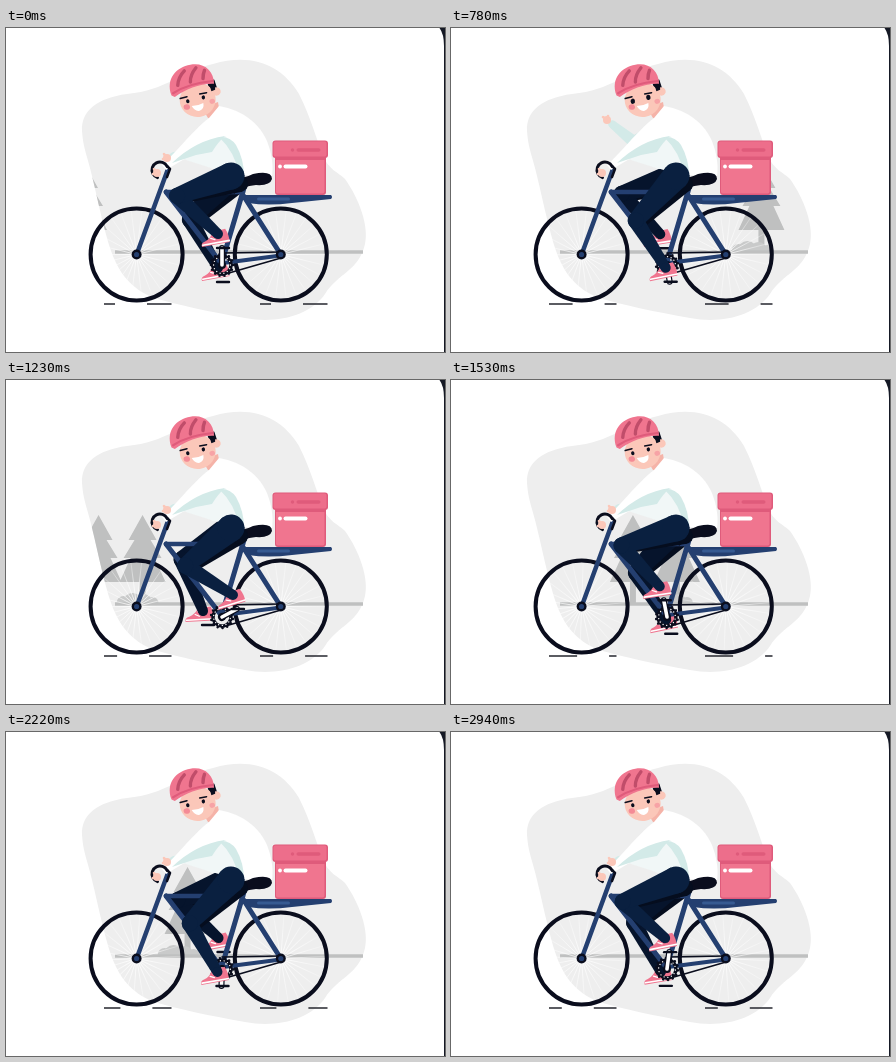
Write an HTML page with a canvas that moves like this. It is 439 px wide and 324 px high and loops after 2970 ms.

```html
<!DOCTYPE html>
<html lang="en">
<head>
<meta charset="utf-8">
<title>Delivery cyclist</title>
<style>
html, body { margin: 0; width: 100%; height: 100%; overflow: hidden; background: #fff; }
canvas { display: block; }
</style>
</head>
<body>
<canvas id="stage" width="439" height="324"></canvas>
<script>
const ctx = document.getElementById('stage').getContext('2d');
const LOOP = 2970, STEP = 30, TURN = LOOP / 2, TAU = 2 * Math.PI;
const INK = '#0a0d1d', BLUE = '#243f70', PINK = '#f0758f', ROSE = '#df5b7b',
      SKIN = '#fbc7b9', TEAL = '#d3eae8', GREY = '#bfc0c0';
const HIP = [229, 152], WAIST = [225, 148], CRANK = [216, 237], THIGH = 60, CALF = 56;
const FRONT = 130.6, REAR = 274.8, AXLE = 226.5;

const blob = new Path2D('M76 103C75 83 91 70 121 66C161 62 174 44 207 36C245 25 275 36 293 66C305 90 310 110 317 128C323 142 332 144 339 151C354 172 363 199 359 216C353 243 332 245 319 266C304 288 270 296 239 290C205 284 172 277 148 270C118 258 108 235 101 210C93 180 91 168 86 148C82 130 77 120 76 103Z');
const torso = new Path2D('M203 90L213 78C237 82 258 97 264 122C267 134 267 142 266 148L237 147L205 140L190 124L160 142L156 137C168 127 186 103 203 90Z');

const lerp = (a, b, p) => a + (b - a) * p;
const mix = (a, b, p) => [lerp(a[0], b[0], p), lerp(a[1], b[1], p)];
const ease = (a, b, t) => {
  const p = Math.min(1, Math.max(0, (t - a) / (b - a)));
  return p * p * (3 - 2 * p);
};

function fill(path, color) {
  ctx.fillStyle = color;
  ctx.fill(typeof path === 'string' ? new Path2D(path) : path);
}
function line(path, color, width, cap = 'round') {
  ctx.strokeStyle = color;
  ctx.lineWidth = width;
  ctx.lineCap = cap;
  ctx.lineJoin = 'round';
  ctx.stroke(new Path2D(path));
}
function arc(x, y, r, color, width, from = 0, to = TAU) {
  ctx.strokeStyle = color;
  ctx.lineWidth = width;
  ctx.beginPath();
  ctx.arc(x, y, r, from, to);
  ctx.stroke();
}
function oval(x, y, rx, ry, color, turn = 0) {
  ctx.fillStyle = color;
  ctx.beginPath();
  ctx.ellipse(x, y, rx, ry, turn, 0, TAU);
  ctx.fill();
}
const dot = (x, y, r, color) => oval(x, y, r, r, color);
function box(x, y, w, h, r, color) {
  ctx.fillStyle = color;
  ctx.beginPath();
  ctx.roundRect(x, y, w, h, r);
  ctx.fill();
}
function placed(x, y, turn, draw) {
  ctx.save();
  ctx.translate(x, y);
  ctx.rotate(turn);
  draw();
  ctx.restore();
}
// Tapered limb with round ends
function limb(a, b, wa, wb, color) {
  const turn = Math.atan2(b[1] - a[1], b[0] - a[0]);
  const len = Math.hypot(b[0] - a[0], b[1] - a[1]);
  placed(a[0], a[1], turn, () => {
    fill(`M0 ${-wa / 2}L${len} ${-wb / 2}V${wb / 2}L0 ${wa / 2}Z`, color);
    dot(0, 0, wa / 2, color);
    dot(len, 0, wb / 2, color);
  });
}

function tree(x) {
  fill(`M${x} 135l14 25h-6l11 18h-7l11 24h-20v21h-6v-21h-20l11-24h-7l11-18h-6Z`, GREY);
}
function bush(x) {
  for (const [dx, r] of [[-13, 7], [-4, 10], [7, 9], [16, 6]]) {
    ctx.beginPath();
    ctx.arc(x + dx, 223, r, Math.PI, TAU);
    ctx.fillStyle = '#c9caca';
    ctx.fill();
  }
}

function scenery(t) {
  fill(blob, '#eeeeee');
  ctx.save();
  ctx.clip(blob);
  const shift = 0.298 * t;
  for (const x of [78, -274, -230, -480]) tree(x + shift);
  for (const x of [68, -236, -490]) bush(x + shift);
  ctx.restore();
  line('M109 224H357', GREY, 3.5, 'butt');
}

function road(t) {
  for (const x of [98, 254]) {
    ctx.save();
    ctx.beginPath();
    ctx.rect(x, 270, 67.5, 12);
    ctx.clip();
    const start = (0.27 * t + 11) % 66 - 34;
    for (let i = -1; i < 2; i++) box(x + start + 66 * i, 275.2, 34, 1.6, 0, '#25262e');
    ctx.restore();
  }
}

function wheel(x, t) {
  placed(x, AXLE, -0.0059 * t, () => {
    const glow = ctx.createRadialGradient(0, 0, 5, 0, 0, 45);
    glow.addColorStop(0, 'rgba(255,255,255,.8)');
    glow.addColorStop(1, 'rgba(255,255,255,.25)');
    let spokes = '';
    for (let i = 0; i < 26; i++) {
      const a = i * TAU / 26;
      spokes += `M0 0L${45 * Math.cos(a)} ${45 * Math.sin(a)}`;
    }
    line(spokes, glow, 0.9);
  });
  arc(x, AXLE, 46, INK, 4);
}

function hub(x) {
  dot(x, AXLE, 5, INK);
  dot(x, AXLE, 2.6, BLUE);
}

const pedal = angle => [CRANK[0] - 17 * Math.sin(angle), CRANK[1] - 17 * Math.cos(angle)];

function shoe(x, y, turn) {
  placed(x, y, turn, () => {
    fill('M-5 -3L8 -4Q11 3 10 10H-18Q-19 6 -14 5Q-8 3 -5 -3Z', PINK);
    line('M-17 8.3H10', '#fff', 1.6);
    line('M-8 3L-4 5M-5 0L-1 3', '#fff', 1.3);
  });
}

function leg(angle, color, shade) {
  const [px, py] = pedal(angle);
  const ankle = [px - 4, py - 14];
  const dx = ankle[0] - HIP[0], dy = ankle[1] - HIP[1], d = Math.hypot(dx, dy);
  const along = (THIGH ** 2 - CALF ** 2 + d * d) / (2 * d);
  const out = Math.sqrt(THIGH ** 2 - along ** 2);
  const knee = [HIP[0] + (dx * along - dy * out) / d, HIP[1] + (dy * along + dx * out) / d];
  line(`M${px - 5} ${py}h12`, INK, 2.4);
  shoe(ankle[0], ankle[1], -0.18 + 0.14 * Math.sin(angle));
  limb([234, 156], [knee[0] + 5, knee[1] + 3], 16, 10, shade);
  limb(knee, ankle, 16, 10, color);
  limb(WAIST, knee, 27, 16, color);
}

function crankArm(angle) {
  const path = `M${CRANK}L${pedal(angle)}`;
  line(path, INK, 6);
  line(path, '#fff', 3.6);
}

function frame() {
  line('M160 164H237', BLUE, 4.5);
  line('M160 164L215 235M238 160L216 234M237 167L274.8 226.5', BLUE, 5);
  line('M217 235L274.8 227.5', BLUE, 4);
  line('M130.6 226.5L162 141', BLUE, 4.5);
  fill('M239 167H325Q327 169 325 171L286 175Q262 178 242 175Z', BLUE);
  box(251, 169.5, 33, 3, 1.5, '#365a91');
  line('M216 225L275 224M216 247L275 230', INK, 1.6);
}

function chainring(angle) {
  placed(CRANK[0], CRANK[1], -angle, () => {
    arc(0, 0, 9, INK, 3.5);
    for (let i = 0; i < 14; i++) {
      const a = i * TAU / 14;
      dot(11 * Math.cos(a), 11 * Math.sin(a), 1.3, INK);
      dot(8.4 * Math.cos(a), 8.4 * Math.sin(a), 0.7, '#fff');
    }
    dot(0, 0, 4, INK);
  });
}

function parcel() {
  box(269, 127, 51, 40, 3, ROSE);
  box(270, 128, 48.5, 37.5, 2, PINK);
  box(269.5, 129, 50, 3, 0, ROSE);
  box(266.5, 112.5, 55.5, 17.5, 3, ROSE);
  box(267.5, 113.5, 53, 15, 2, '#ed6e8b');
  dot(286.5, 122, 1.7, ROSE);
  box(290.5, 120.2, 24, 3.6, 1.8, ROSE);
  dot(274, 138.5, 1.9, '#fff');
  box(277.5, 136.5, 24, 4, 2, '#fff');
}

function hand(x, y, open) {
  dot(x, y, 4, SKIN);
  line(`M${x} ${y}l-4 ${lerp(1, -3, open)}M${x} ${y}l${lerp(-3, 1, open)} -4`, SKIN, 2.6);
}

function farArm(palm, p) {
  const elbow = mix([193, 122], [183, 114], p);
  limb([208, 101], elbow, 16, 12, TEAL);
  limb(elbow, mix(palm, elbow, 0.2), 12, 8, TEAL);
}

function body() {
  fill('M196 80L212 74L214 86Q210 93 202 90Z', '#f5b3a8');
  fill(torso, '#fff');
  fill('M177 131L219 108Q231 118 238 147L205 140Z', '#f1f7f7');
  fill('M166 135Q190 112 219 108Q212 114 206 124L190 127Z', TEAL);
  fill('M213 109Q224 108 230 117Q238 131 238 148L233 146Q229 124 213 109Z', TEAL);
}

function head(t, wave) {
  const lift = ease(270, 420, t) * (1 - ease(480, 700, t));
  placed(191 + 2 * lift, 68 - 2 * lift, -0.18, () => {
    ctx.translate(-191, -68);
    fill('M203 52L211 55L213 70L205 70Z', INK);
    dot(211, 67, 4.2, SKIN);
    oval(191, 72, 18, 17, SKIN);
    fill('M205 56L211 57L210 65L206 66Z', INK);
    oval(179, 77, 3.2, 2.8, '#f48b96');
    oval(205, 76, 2.8, 2.5, '#f7a3a6');
    const eye = 1.7 + 0.5 * wave;
    oval(181, 71.5, eye, eye * 1.2, INK);
    oval(197, 70.5, eye, eye * 1.2, INK);
    line('M174 67.5L181 67M194 66.5L201 66.5', INK, 1.5);
    fill('M184 77Q190 78 196 76Q196 82 191 83Q186 83 184 77Z', '#fff');
    fill('M166 63C163 45 176 36 190 36C204 36 212 46 210 59C197 56 181 59 169 65Z', PINK);
    line('M168 61Q184 54 209 56', ROSE, 2.2);
    line('M174 54Q176 46 183 41M187 53Q188 46 195 40M200 52Q201 47 203 44', '#c04d6a', 3.4);
  });
}

function draw(t) {
  const angle = TAU * t / TURN;
  const wave = ease(270, 600, t) * (1 - ease(900, 1200, t));
  const sway = 3 * wave * Math.sin((t - 780) / 70);
  const palm = mix([161, 130], [156 + sway, 92], wave);
  ctx.fillStyle = '#fff';
  ctx.fillRect(0, 0, 439, 324);
  fill('M433.5 0Q438 6 438 18V324H439V0Z', '#151925');
  scenery(t);
  road(t);
  leg(angle + Math.PI, '#06142c', '#050d1e');
  wheel(FRONT, t);
  wheel(REAR, t);
  frame();
  hub(FRONT);
  hub(REAR);
  chainring(angle);
  crankArm(angle);
  parcel();
  farArm(palm, wave);
  body();
  hand(...palm, wave);
  fill('M222 151Q238 151 247 146Q266 142 266 151Q264 158 250 157Q236 158 228 166Z', INK);
  leg(angle, '#0a2040', '#050d1e');
  arc(154, 142, 8, INK, 3, 0.6 * Math.PI, 1.85 * Math.PI);
  line('M161 138L164 141L161 149', INK, 2.5);
  hand(151, 145, 0);
  head(t, wave);
}

function tick(now) {
  draw(Math.floor(now % LOOP / STEP) * STEP);
  requestAnimationFrame(tick);
}
draw(0);
requestAnimationFrame(tick);
</script>
</body>
</html>
```
